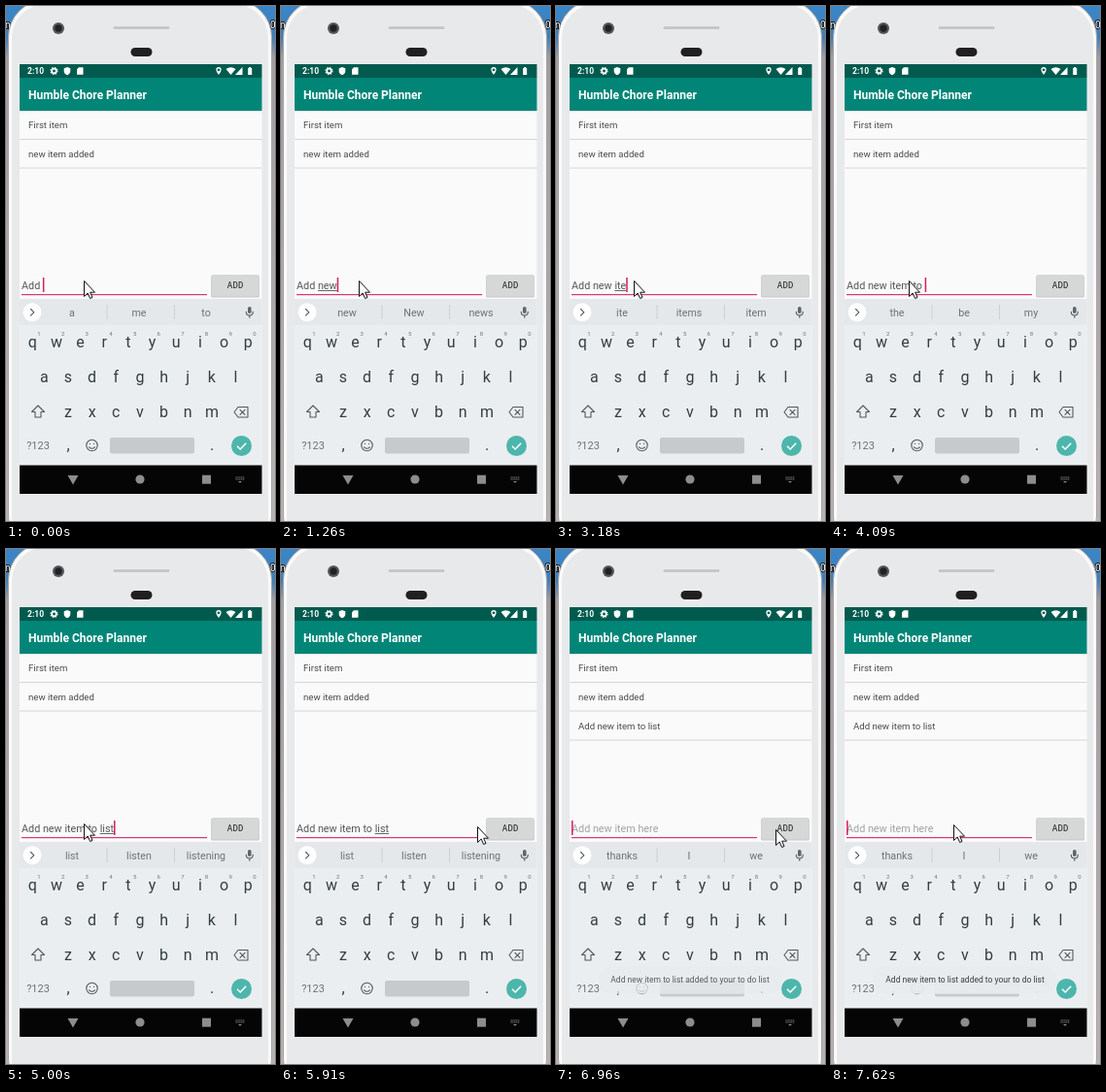
Recreate the animation shown at these times as an HTML page. Size 277 by 531 pixels, loop 8 s.

```html
<!DOCTYPE html>
<html lang="en">
<head>
<meta charset="utf-8">
<title>To-do list demo</title>
<style>
  html, body { margin: 0; width: 100%; height: 100%; overflow: hidden; }
  svg { display: block; width: 277px; height: 531px; }
  text { font-family: Roboto, sans-serif; white-space: pre; }
  .mid text { text-anchor: middle; }
  .desk { font-size: 10px; fill: #fff; stroke: #15181c; stroke-width: 2px; paint-order: stroke; }
  .item { font-size: 9.6px; fill: #4a4a4a; }
  .key { font-size: 16px; fill: #333e45; }
  .num { font-size: 6px; fill: #6b757b; }
  .word { font-size: 10.7px; fill: #6b7276; }
  .line { fill: none; stroke: #50595f; stroke-width: 1.1; stroke-linejoin: round; stroke-linecap: round; }
</style>
</head>
<body>
<svg viewBox="0 0 277 531">
  <defs>
    <linearGradient id="desk" x2="0" y2="1">
      <stop offset="0" stop-color="#3a86c8"/>
      <stop offset=".06" stop-color="#3f7fb8"/>
      <stop offset=".1" stop-color="#a39da2"/>
      <stop offset="1" stop-color="#b9b2b2"/>
    </linearGradient>
  </defs>

  <!-- desktop and phone shell -->
  <rect width="277" height="531" fill="url(#desk)"/>
  <text class="desk" x="-1" y="23">n</text>
  <text class="desk" x="272" y="23">0</text>
  <rect x="2.500" y="-6" width="271" height="570" rx="38" fill="#fafafa" stroke="#aaa6a6"/>
  <rect x="6" y="-2" width="264" height="570" rx="35" fill="#e8e9eb"/>
  <circle cx="54" cy="23" r="6" fill="#55555a"/>
  <circle cx="54" cy="23" r="3.700" fill="#222226"/>
  <rect x="110" y="20.500" width="59" height="4" rx="2" fill="#c6c7c9" stroke="#f2f2f3" stroke-width=".7"/>
  <rect x="128.500" y="43" width="22" height="9" rx="4.500" fill="#211f20"/>

  <!-- app -->
  <rect x="14" y="60" width="249.500" height="443" fill="#fafafa"/>
  <rect x="14" y="60" width="249.500" height="14" fill="#005a4e"/>
  <rect x="14" y="74" width="249.500" height="34" fill="#008577"/>
  <rect x="14" y="108" width="249.500" height="1" fill="#e3e6e5"/>
  <g fill="#fff">
    <text x="22" y="70" font-size="8.500" font-weight="600">2:10</text>
    <circle cx="49.500" cy="67" r="2.300" fill="none" stroke="#fff" stroke-width="1.700"/>
    <circle cx="49.500" cy="67" r="3.500" fill="none" stroke="#fff" stroke-width="1.200" stroke-dasharray="1.400 1.350"/>
    <path d="M63 63l3.300 1.300v2.700q0 3-3.300 4.200q-3.300-1.200-3.300-4.200v-2.700z"/>
    <path d="M75 63.300h4.500v7.500h-6.500v-5.500z"/>
    <path d="M219 71q-2.700-3.500-2.700-5.200a2.700 2.700 0 0 1 5.400 0q0 1.700-2.700 5.200zM219 64.400a1.400 1.400 0 1 0 .01 0z" fill-rule="evenodd"/>
    <path d="M226.500 65q5-3.500 10 0l-5 6z"/>
    <path d="M243.500 63v8h-7.500z"/>
    <path d="M249.200 64h1v-1h2v1h1v7h-4z"/>
    <text x="23" y="96" font-size="12" font-weight="600">Humble Chore Planner</text>
  </g>
  <g class="item">
    <text x="23" y="126.300">First item</text>
    <text x="23" y="156">new item added</text>
    <path d="M14 137.500h249.500M14 167h249.500" stroke="#d6d6d6"/>
    <g id="added">
      <text x="23" y="185.800">Add new item to list</text>
      <path d="M14 197h249.500" stroke="#d6d6d6"/>
    </g>
  </g>

  <!-- entry row -->
  <text id="entry" x="16" y="292" font-size="10.8"></text>
  <rect id="under" y="293" height="1" fill="#666"/>
  <rect id="caret" y="280" width="1.500" height="15" fill="#d81b60"/>
  <rect x="16" y="297" width="191" height="1.200" fill="#d8376e"/>
  <rect x="211" y="278" width="50" height="22.500" rx="1.500" fill="#c8c8c8"/>
  <rect id="button" x="211.500" y="277" width="49" height="22.500" rx="1.500"/>
  <text x="236.200" y="291" font-size="8.200" font-weight="500" letter-spacing=".3" text-anchor="middle" fill="#3a3a3a">ADD</text>

  <!-- keyboard -->
  <rect x="14" y="302" width="249.500" height="171.500" fill="#ebeef0"/>
  <rect x="14" y="302" width="249.500" height="27" fill="#e5e8ea"/>
  <circle cx="27" cy="315.800" r="9.500" fill="#fff"/>
  <path class="line" d="M25.500 312.500l3.300 3.300l-3.300 3.300"/>
  <path d="M104 308v15M173.500 308v15" stroke="#cbd0d3"/>
  <g id="words" class="mid"></g>
  <rect x="249" y="310" width="3.600" height="7" rx="1.800" fill="#5d666b"/>
  <path class="line" d="M247.300 315.200q0 3.800 3.500 3.800t3.500-3.800M250.800 319v2.300"/>
  <g id="keys" class="mid"></g>
  <path class="line" d="M33 412l6.500 6.500h-3.500v5.500h-6v-5.500h-3.500z"/>
  <path class="line" d="M239 413.500h10v10.500h-10l-4-5.250zM241 416.300l5 5M246 416.300l-5 5"/>
  <circle class="line" cx="88.500" cy="453" r="5.700"/>
  <path class="line" d="M86.500 451.200v.3M90.500 451.200v.3M85.500 454.800q3 3 6 0"/>
  <rect x="107" y="445" width="87" height="16.500" rx="2" fill="#c7cacc"/>

  <g id="toast">
    <rect x="43" y="430" width="190" height="28.800" rx="14.400" fill="#e9ecee" opacity=".94"/>
    <text x="138" y="447" font-size="8.500" text-anchor="middle" fill="#3c3c3c">Add new item to list added to your to do list</text>
  </g>
  <circle cx="242.500" cy="453.500" r="10.500" fill="#4db6ac"/>
  <path d="M238 453.800l3.200 3.200l6-6.300" fill="none" stroke="#fff" stroke-width="1.500"/>

  <!-- navigation bar -->
  <rect x="14" y="473.500" width="249.500" height="29.500" fill="#050505"/>
  <g fill="#8d8d8d">
    <path d="M63.500 484h11l-5.500 9.500z"/>
    <circle cx="138" cy="488" r="4.600"/>
    <rect x="202" y="483.700" width="9" height="9"/>
    <path d="M236.500 486h9M236.500 488h9" stroke="#8d8d8d" stroke-width="1.200" stroke-dasharray="1.200 .7"/>
    <path d="M239 490h4l-2 1.700z"/>
  </g>

  <path id="mouse" d="M.5.5v16l3.700-3.500l2.400 5.500l2.400-1l-2.300-5.300h4.800z" fill="#fff" stroke="#111" stroke-linejoin="round"/>
</svg>

<script>
const LOOP = 8000, LEFT = 16;
const $ = id => document.getElementById(id);
const pen = document.createElement("canvas").getContext("2d");
pen.font = "10.8px Roboto, sans-serif";
const textWidth = s => pen.measureText(s).width;

function label(parent, cls, x, y, s) {
  const t = document.createElementNS("http://www.w3.org/2000/svg", "text");
  t.setAttribute("class", cls);
  t.setAttribute("x", x);
  t.setAttribute("y", y);
  t.textContent = s;
  parent.append(t);
  return t;
}

const row = (s, x, y) => [...s].forEach((c, i) => label($("keys"), "key", x + i * 24.65, y, c));
row("qwertyuiop", 27.3, 351.5);
row("asdfghjkl", 39.3, 387.5);
row("zxcvbnm", 64, 423.5);
[..."1234567890"].forEach((c, i) => label($("keys"), "num", 34 + i * 24.65, 340, c));
label($("keys"), "word", 33, 457, "?123").style.fontSize = "11px";
label($("keys"), "key", 64, 457.5, ",");
label($("keys"), "key", 212, 457.5, ".");
const words = [68, 137, 206].map(x => label($("words"), "word", x, 319.8, ""));

// time, settled text, word being typed, suggestions
const typing = [
  [0, "Add ", "", "a me to"],
  [890, "Add ", "n", "n no not"],
  [1140, "Add ", "ne", "ne need new"],
  [1260, "Add ", "new", "new New news"],
  [2250, "Add new ", "", "year one and"],
  [2810, "Add new ", "i", "I in is"],
  [3060, "Add new ", "it", "it its it's"],
  [3180, "Add new ", "ite", "ite items item"],
  [3450, "Add new ", "item", "item items item's"],
  [3700, "Add new item ", "", "for in to"],
  [3840, "Add new item ", "t", "t to the"],
  [3960, "Add new item ", "to", "to too the"],
  [4090, "Add new item to ", "", "the be my"],
  [4610, "Add new item to ", "l", "l let like"],
  [4880, "Add new item to ", "lis", "list lis listen"],
  [5000, "Add new item to ", "list", "list listen listening"],
  [6570, "", "", "list listen listening"],
  [6810, "", "", "thanks I we"]
];
const caret = [[0, 1], [520, 0], [890, 1], [1840, 0], [2250, 1], [5500, 0],
  [6030, 1], [6450, 0], [6570, 1], [7080, 0], [7620, 1]];
const mouse = [[0, 80, 283], [5650, 97, 283], [5790, 151, 281], [5910, 202, 286], [6030, 218, 289],
  [6180, 226, 289], [7080, 168, 284], [7230, 147, 283], [7350, 133, 283], [7470, 126, 284]];
const button = [[0, "#d6d7d7"], [6450, "#bdbebe"], [6810, "#c8c9c9"], [6960, "#d6d7d7"]];
const toast = [[0, 0], [6690, .2], [6810, .5], [6960, .82], [7080, 1]];

const at = (steps, t) => steps.findLast(s => s[0] <= t);

function draw(t) {
  const [, done, word, hints] = at(typing, t);
  const text = done + word, start = LEFT + textWidth(done);
  $("entry").textContent = text || "Add new item here";
  $("entry").setAttribute("fill", text ? "#555" : "#a2a2a2");
  $("under").setAttribute("x", start);
  $("under").setAttribute("width", textWidth(word));
  $("caret").setAttribute("x", LEFT + textWidth(text));
  $("caret").style.opacity = at(caret, t)[1];
  hints.split(" ").forEach((h, i) => words[i].textContent = h);
  $("added").style.opacity = t >= 6570 ? 1 : 0;
  $("button").setAttribute("fill", at(button, t)[1]);
  $("toast").style.opacity = at(toast, t)[1];
  const [, x, y] = at(mouse, t);
  $("mouse").setAttribute("transform", `translate(${x} ${y})`);
}

const begin = performance.now();
function tick() {
  draw((performance.now() - begin) % LOOP);
  requestAnimationFrame(tick);
}
tick();
</script>
</body>
</html>
```
